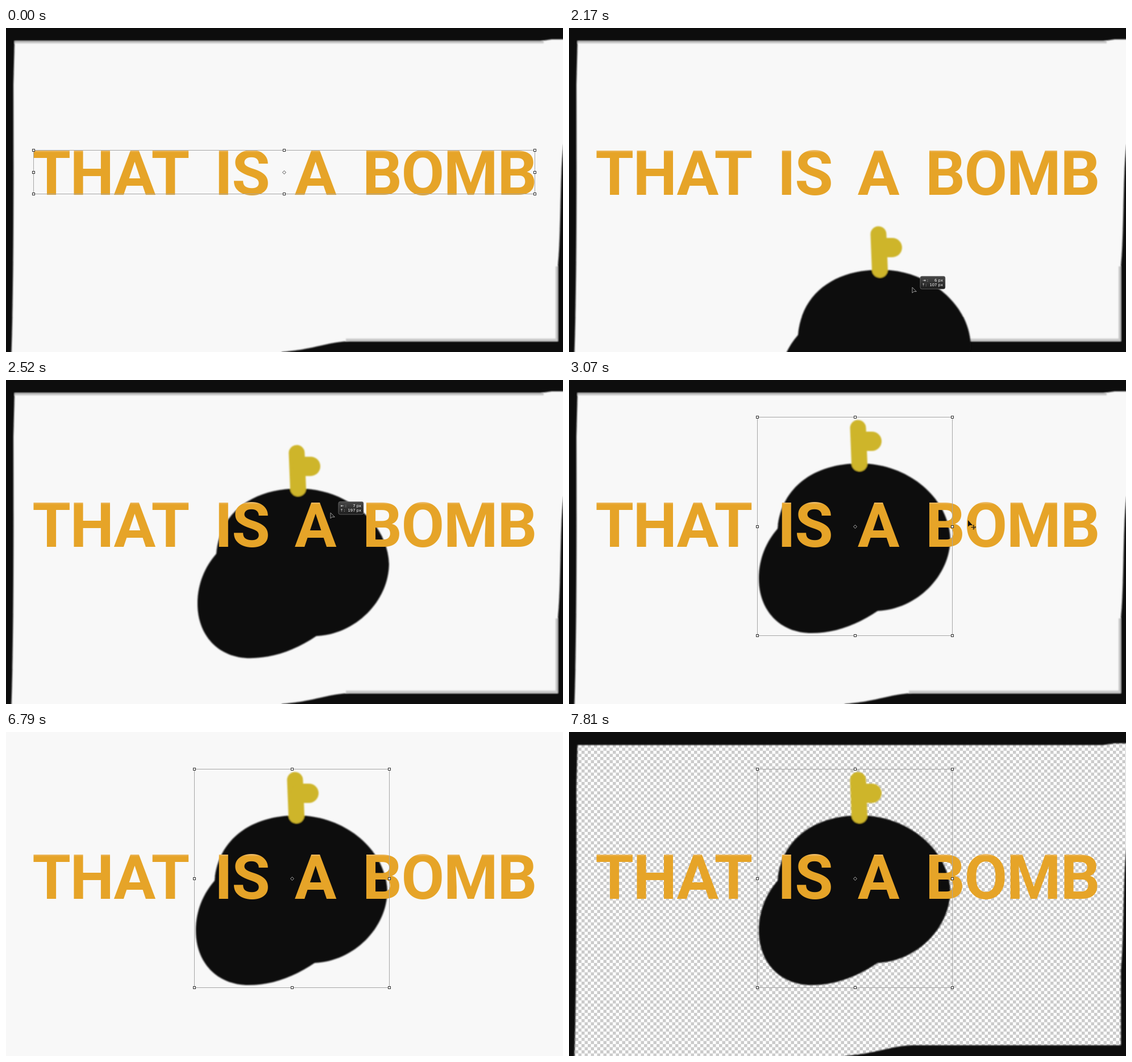
These frames come from a looping animation (980x571 px, 8 s). An HTML page:

```html
<!DOCTYPE html>
<html lang="en">
<head>
<meta charset="utf-8">
<title>That is a bomb</title>
<style>
  html, body { margin: 0; width: 100%; height: 100%; overflow: hidden; background: #f8f8f8; }
  svg { display: block; width: 980px; height: 571px; }
  .headline { font: 700 109.7px Roboto, "Liberation Sans", sans-serif; letter-spacing: -1.5px; text-anchor: middle; }
  .hint { font: 6.8px "DejaVu Sans", sans-serif; fill: #fff; }
  .value { text-anchor: end; }
  .outline { fill: none; stroke: #a6a6a6; }
  .handle { fill: #fff; stroke: #333; }
  .center { fill: none; stroke: #fff; stroke-opacity: .7; mix-blend-mode: difference; }
</style>
</head>
<body>
<svg viewBox="0 0 980 571">
  <defs>
    <pattern id="checker" width="11" height="11" patternUnits="userSpaceOnUse">
      <rect width="11" height="11" fill="#fff"/>
      <path d="M0 0H5.5V11H11V5.5H0Z" fill="#cbcbcb"/>
    </pattern>
    <linearGradient id="amber" gradientUnits="userSpaceOnUse" x1="0" y1="215" x2="0" y2="219.5">
      <stop stop-color="#efc27a"/><stop offset="1" stop-color="#e6a428"/>
    </linearGradient>
    <linearGradient id="panel" x2="0" y2="1">
      <stop stop-color="#484848"/><stop offset="1" stop-color="#1c1c1c"/>
    </linearGradient>
    <filter id="soft" filterUnits="userSpaceOnUse" x="-20" y="-20" width="1020" height="1020">
      <feGaussianBlur stdDeviation="1.1"/>
    </filter>
  </defs>

  <rect id="paper" width="980" height="571"/>
  <g id="frame" filter="url(#soft)">
    <path id="bevel" fill="none" stroke="#c6c6c6" stroke-width="4" d="M15 25H946M969 420V549.5H598"/>
    <path fill="#0d0d0d" fill-rule="evenodd"
      d="M-20-20H1000V591H-20ZM15 23H940L960 20H1000V205H981C974 260 977 360 971 420V552H605C565 553 545 566 485 571V591H9C12 500 14 400 13 100Z"/>
  </g>

  <g id="bomb" filter="url(#soft)">
    <path fill="#0d0d0d" d="M367 262C373 190 430 147 512 147S668 205 671 280C670 346 612 404 543 407C505 433 465 446 427 446C370 446 334 405 334 350C334 315 347 285 367 262Z"/>
    <path stroke="#ceb52c" stroke-width="28" stroke-linecap="round" d="M508.5 84.5L511 147"/>
    <path stroke="#ceb52c" stroke-width="34" stroke-linecap="round" d="M518 108H533"/>
  </g>

  <text class="headline" fill="url(#amber)" y="294">
    <tspan x="184">THAT</tspan><tspan x="415">IS</tspan><tspan x="544">A</tspan><tspan x="780">BOMB</tspan>
  </text>

  <g id="textBox"></g>
  <g id="bombBox"></g>

  <g id="drag">
    <path d="M0 0V10L2.8 7.5H7.3Z" fill="#111" stroke="#a8a8a8" stroke-width=".9"/>
    <rect x="14" y="-19.5" width="44" height="22.5" rx="3" fill="url(#panel)" stroke="#777" stroke-width=".7"/>
    <g class="hint">
      <text id="arrowX" x="18" y="-10"></text><text id="valueX" class="value" x="54" y="-10"></text>
      <text x="18" y="-1.5">⤒ :</text><text id="valueY" class="value" x="54" y="-1.5"></text>
    </g>
  </g>
  <g id="pointer">
    <path d="M0 0V11.5L3 9H8Z" fill="#0d0d0d"/>
    <path d="M6 12.5H14M10 8.5V16.5" stroke="#0d0d0d" stroke-width="1.2"/>
    <path d="M10 8.5L14 12.5L10 16.5L6 12.5Z" fill="none" stroke="#0d0d0d" stroke-dasharray="1.4 2.8" stroke-dashoffset=".7"/>
  </g>
</svg>
<script>
const LOOP = 8000;
const DOC_PIXEL = 2.6;
const DRAG_START = 2080, DRAG_END = 2860;

const $ = id => document.getElementById(id);
const show = (node, on) => node.setAttribute("display", on ? "inline" : "none");
const move = (node, x, y) => node.setAttribute("transform", `translate(${x} ${y})`);
const within = (t, from, to) => t >= from && t < to;
const clamp = k => Math.min(1, Math.max(0, k));
const mix = (a, b, k) => a + (b - a) * k;

// Each glide holds its end position until the pointer leaves.
const glides = [
  { start: DRAG_END, end: 3070, leave: 3860, from: [569, 191], to: [702, 247] },
  { start: 3860, end: 4420, leave: 4420, from: [712, 244], to: [960, 238] },
  { start: 4790, end: 4900, leave: 5140, from: [873, 364], to: [802, 381] }
];

function buildBox(node, left, top, right, bottom) {
  const xs = [left, Math.round((left + right) / 2), right];
  const ys = [top, Math.round((top + bottom) / 2), bottom];
  let parts = `<rect class="outline" x="${left + .5}" y="${top + .5}" width="${right - left}" height="${bottom - top}"/>`;
  xs.forEach((x, col) => ys.forEach((y, row) => {
    parts += col === 1 && row === 1
      ? `<path class="center" d="M${x - 2.5} ${y + .5}l3-3 3 3-3 3z"/>`
      : `<rect class="handle" x="${x - 1.5}" y="${y - 1.5}" width="4" height="4"/>`;
  }));
  node.innerHTML = parts;
}

function drawDrag(t) {
  const stepped = DRAG_START + Math.floor((t - DRAG_START + 10) / 50) * 50 - 10;
  const left = clamp((DRAG_END - 30 - stepped) / 750);
  const dx = 54.8 * left ** 3.3, dy = 381 * left ** 2.44;
  const px = Math.round(dx / DOC_PIXEL - 8), py = Math.round(214.3 - dy / DOC_PIXEL);
  move($("bomb"), dx, dy);
  move($("drag"), 568 + dx, 192 + dy * .95);
  $("arrowX").textContent = px < 0 ? "⇤ :" : "⇥ :";
  $("valueX").textContent = Math.abs(px) + " px";
  $("valueY").textContent = py + " px";
}

function drawPointer(t) {
  const glide = glides.find(g => within(t, g.start, g.leave));
  show($("pointer"), glide);
  if (!glide) return;
  const k = clamp((t - glide.start) / (glide.end - glide.start));
  move($("pointer"), mix(glide.from[0], glide.to[0], k), mix(glide.from[1], glide.to[1], k));
}

function render(t) {
  const transparent = t >= 7810;
  $("paper").setAttribute("fill", transparent ? "url(#checker)" : "#f8f8f8");
  show($("frame"), !within(t, 6790, 7410));
  show($("bevel"), !transparent);
  show($("textBox"), t < 990);
  show($("bomb"), t >= DRAG_START);
  show($("drag"), within(t, DRAG_START, DRAG_END));
  show($("bombBox"), t >= DRAG_END);
  show(bombOutline, t >= 2890 && !within(t, 5080, 5140));
  drawDrag(t);
  drawPointer(t);
}

buildBox($("textBox"), 48, 215, 930, 292);
buildBox($("bombBox"), 331, 65, 674, 450);
const bombOutline = $("bombBox").querySelector(".outline");

const start = performance.now();
function tick() {
  render((performance.now() - start) % LOOP);
  requestAnimationFrame(tick);
}
tick();
</script>
</body>
</html>
```
